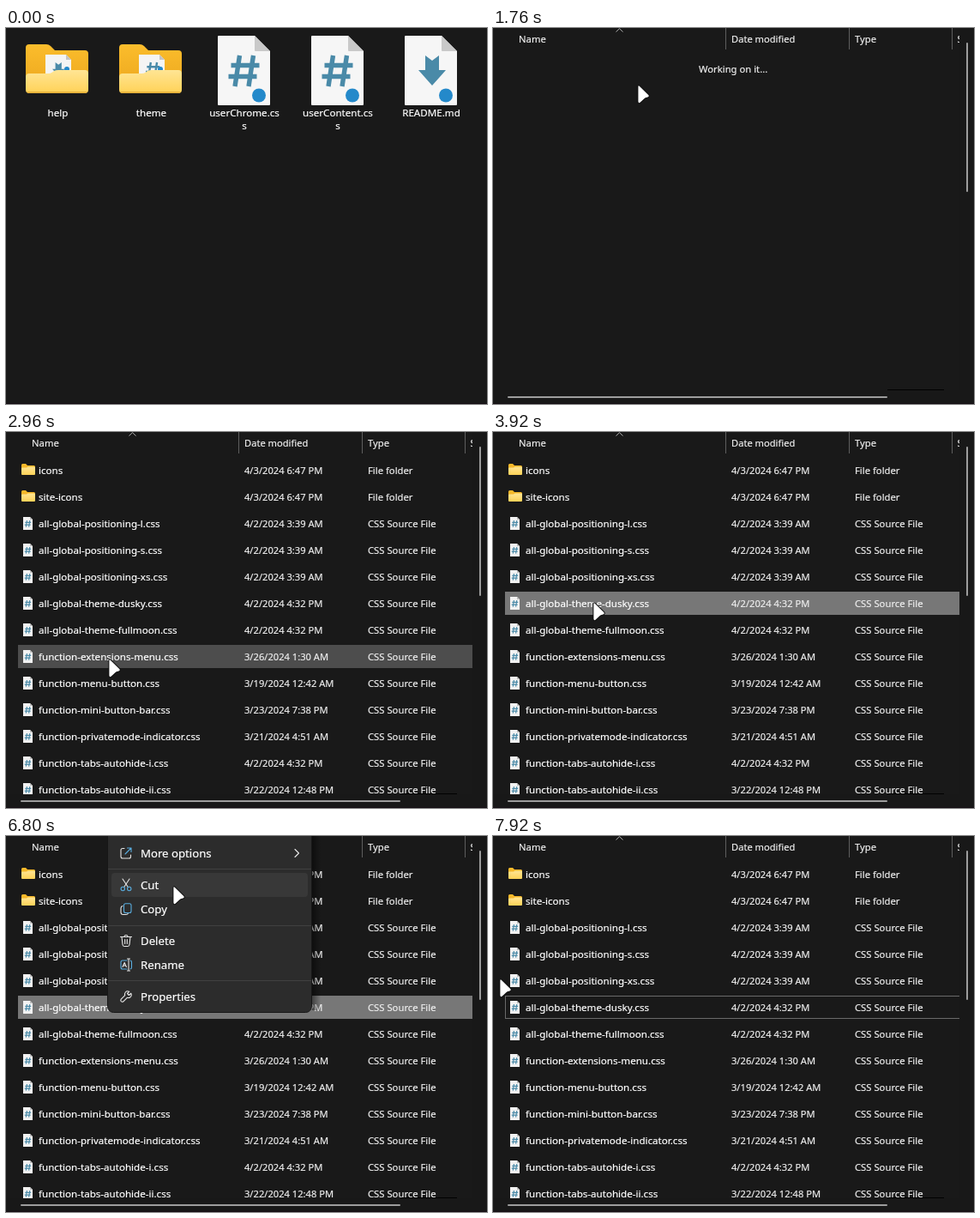
Animation, 561 px wide and 438 px high, one loop 8000 ms. Source, as an HTML page:

```html
<!DOCTYPE html>
<html lang="en">
<head>
<meta charset="utf-8">
<title>File browser</title>
<style>
html, body { margin: 0; width: 100%; height: 100%; overflow: hidden; background: #191919; }
svg { display: block; width: 561px; height: 438px; }
text { font-family: "Noto Sans", "Open Sans", sans-serif; font-size: 11.6px; fill: #fff; stroke: #fff; stroke-width: .2px; white-space: pre; }
.mid { text-anchor: middle; }
.date, .type { fill: #eee; stroke: #eee; }
.date { font-size: 11.15px; }
.type { font-size: 11.28px; }
.menu text { font-size: 13.2px; }
.line { fill: none; stroke: #e6e6e6; stroke-width: 1.1; stroke-linecap: round; stroke-linejoin: round; }
.blue { stroke: #5aaee0; }
</style>
</head>
<body>
<svg id="stage" viewBox="0 0 561 438">
  <defs>
    <linearGradient id="front" x2="0" y2="1">
      <stop stop-color="#ffe594"/><stop offset="1" stop-color="#ffd257"/>
    </linearGradient>
    <linearGradient id="back" x2="0" y2="1">
      <stop stop-color="#fbbd2c"/><stop offset="1" stop-color="#eda81f"/>
    </linearGradient>
    <linearGradient id="shade" x1="0" x2="1">
      <stop stop-color="#000" stop-opacity=".45"/><stop offset="1" stop-color="#000" stop-opacity="0"/>
    </linearGradient>
    <g id="hash" fill="none" stroke="#4a8aa8" stroke-width="5.4">
      <path d="M13 0 7.5 36M29 0 23.500 36M3 11.500H36M0 24.500H33"/>
    </g>
    <path id="arrow" fill="#4a8aa8" d="M8 0 16 6 24 0V17H32L16 35 0 17H8Z"/>
    <g id="page">
      <path d="M1 0H43L61 18V80Q61 81 60 81H1Q0 81 0 80V1Q0 0 1 0Z" fill="#f6f6f6"/>
      <path d="M43 0 61 18H44Q43 18 43 17Z" fill="#c9c9c9"/>
      <circle cx="48" cy="69.500" r="8" fill="#2489ca"/>
    </g>
    <g id="folder">
      <path d="M0 5Q0 1 4 1H24Q27 1 29 3L34 8H69Q73 8 73 12V50H0Z" fill="url(#back)"/>
      <path d="M23 13H47L53 19V44H23Z" fill="#f4f4f4"/>
      <path d="M47 13 53 19H47Z" fill="#c4c4c4"/>
    </g>
    <g id="flap">
      <path d="M0 39Q0 35 4 35H26Q29 35 31 33.500L33 32Q35 31 38 31H69Q73 31 73 35V54Q73 58 69 58H4Q0 58 0 54Z" fill="url(#front)"/>
      <path d="M1 56Q2 58 4 58H69Q71 58 72 56Z" fill="#e8b43c"/>
    </g>
    <g id="dir">
      <path d="M0 1.500Q0 0 1.500 0H5L7 2H14.500Q16 2 16 3.500V11H0Z" fill="url(#back)"/>
      <path d="M0 5.500Q0 4.500 1 4.500H6L7.500 3.500H15Q16 3.500 16 4.500V12Q16 13 15 13H1Q0 13 0 12Z" fill="url(#front)"/>
    </g>
    <g id="css">
      <path d="M0 0H8L11 3V15H0Z" fill="#f2f2f2"/>
      <path d="M8 0 11 3H8Z" fill="#bdbdbd"/>
      <use href="#hash" transform="translate(1.700 4) scale(.21)"/>
    </g>
  </defs>
  <g id="grid"></g>
  <g id="list"></g>
  <g id="menu" class="menu"></g>
  <rect y="437" width="561" height="1" fill="#160f14"/>
  <path id="cursor" d="M.4 1.600Q.4 -.6 2 1L12.200 11Q13.600 12.700 11.400 13.500L8.700 14.300 7.400 15.200 2.800 19.600Q.6 21.200.4 18.500Z" fill="#fff" stroke="#111" stroke-width="2" stroke-linejoin="round" paint-order="stroke"/>
</svg>
<script>
const $ = id => document.getElementById(id);
const LOOP = 8000, STEP = 40, PITCH = 31, PICKED = 5;

// Moments at which the interface switches state
const at = { press: 1280, open: 1520, header: 1600, busy: 1680, ready: 1800, hover: 2040,
  pick: 3920, menuOn: 6280, menuOff: 6960, drop: 7920 };

// Pointer path: time, x, y
const path = [
  [120, 91, 440], [520, 145, 235], [800, 184, 96], [960, 188, 70], [1000, 166, 69], [1040, 169, 67],
  [2000, 169, 67], [2240, 141, 128], [2480, 110, 217], [2720, 116, 284], [2800, 118, 289],
  [2880, 118, 289], [2960, 120, 265], [3320, 121, 236], [3720, 119, 210], [3800, 117, 199],
  [5120, 117, 199], [5160, 117, 194], [6080, 117, 194], [6120, 117, 199],
  [6480, 117, 199], [6640, 160, 118], [6800, 195, 59], [6920, 195, 62],
  [7120, 138, 112], [7320, 58, 163], [7600, 8, 167]
];

const files = [
  ["icons", "4/3/2024 6:47 PM"], ["site-icons", "4/3/2024 6:47 PM"],
  ["all-global-positioning-l.css", "4/2/2024 3:39 AM"],
  ["all-global-positioning-s.css", "4/2/2024 3:39 AM"],
  ["all-global-positioning-xs.css", "4/2/2024 3:39 AM"],
  ["all-global-theme-dusky.css", "4/2/2024 4:32 PM"],
  ["all-global-theme-fullmoon.css", "4/2/2024 4:32 PM"],
  ["function-extensions-menu.css", "3/26/2024 1:30 AM"],
  ["function-menu-button.css", "3/19/2024 12:42 AM"],
  ["function-mini-button-bar.css", "3/23/2024 7:38 PM"],
  ["function-privatemode-indicator.css", "3/21/2024 4:51 AM"],
  ["function-tabs-autohide-i.css", "4/2/2024 4:32 PM"],
  ["function-tabs-autohide-ii.css", "3/22/2024 12:48 PM"]
];

// Label, centre y, icon strokes in a 14 px box
const commands = [
  ["More options", 20, '<path class="line" d="M5 1.500H3Q1 1.500 1 3.500V11Q1 13 3 13H10.500Q12.500 13 12.500 11V9"/><path class="line blue" d="M8.500 1H13V5.500M13 1 6 8"/>'],
  ["Cut", 57, '<path class="line" d="M3 0 9.300 9.500M11 0 4.700 9.500"/><circle class="line blue" cx="3.300" cy="11.500" r="2.200"/><circle class="line blue" cx="10.700" cy="11.500" r="2.200"/>'],
  ["Copy", 85, '<path class="line" d="M3 3.500Q1 4 1 6V11Q1 13.500 3.500 13.500H7Q9 13.500 9.500 11.800"/><rect class="line blue" x="4.500" y=".7" width="8.500" height="10.800" rx="2"/>'],
  ["Delete", 122, '<path class="line" d="M.5 2.500H13.500M5 2.500Q5 .5 7 .5T9 2.500M2 2.500 3 11.500Q3.200 13.500 5 13.500H9Q10.800 13.500 11 11.500L12 2.500M5.700 5.500V10.500M8.300 5.500V10.500"/>'],
  ["Rename", 150, '<path class="line blue" d="M8 2H3Q1 2 1 4V10Q1 12 3 12H8M12 2Q13.500 2.300 13.500 4V10Q13.500 11.700 12 12"/><path class="line" d="M8.500 0H11.500M8.500 14H11.500M10 0V14M3 9.500 5.200 4.500 7.400 9.500M3.700 8H6.700"/>'],
  ["Properties", 187, '<path class="line" d="M12.800 3.200 10.500 5.500 8.500 3.500 10.800 1.200Q8 0 6.300 2 5 3.700 5.700 5.700L1.200 10.200Q.2 11.500 1.300 12.700 2.500 13.800 3.800 12.800L8.300 8.300Q10.300 9 12 7.700 14 6 12.800 3.200Z"/>']
];

const text = (x, y, s, cls = "") => `<text x="${x}" y="${y}" class="${cls}">${s}</text>`;
const use = (id, x, y, scale = 1) => `<use href="#${id}" transform="translate(${x} ${y}) scale(${scale})"/>`;
const rect = (x, y, w, h, fill, more = "") =>
  `<rect x="${x}" y="${y}" width="${w}" height="${h}" fill="${fill}" ${more}/>`;

function folder(x, sign, label) {
  return use("folder", x, 18) + use(sign, x + 31, 40, .45) +
    `<circle cx="${x + 48}" cy="48" r="3" fill="#2489ca"/>` +
    use("flap", x, 18) + text(x + 37.500, 103, label, "mid");
}
function page(x, sign, dx, label) {
  return use("page", x, 9) + use(sign, x + dx, 32) + text(x + 31, 103, label, "mid");
}

$("grid").innerHTML =
  rect(123, 6, 92, 103, "none", 'id="tile"') +
  folder(23, "arrow", "help") + folder(132, "hash", "theme") +
  page(247, "hash", 12.500, "userChrome.cs") + text(278, 118, "s", "mid") +
  page(356, "hash", 12.500, "userContent.cs") + text(387, 118, "s", "mid") +
  page(465, "arrow", 16, "README.md");

const rowTop = i => PITCH * (i + 1);
const rows = files.map(([name, date], i) => {
  const y = rowTop(i), base = y + 18;
  const isDir = !name.includes(".");
  return rect(14, y, 530, 27, "none", 'class="row"') +
    (isDir ? use("dir", 18, y + 6) : use("css", 20, y + 6)) +
    text(38, base, name) + text(278, base, date, "date") +
    text(422, base, isDir ? "File folder" : "CSS Source File", "type");
}).join("");

$("list").innerHTML =
  `<g id="rows">${rows}</g>` +
  rect(14.500, rowTop(PICKED) + .5, 530, 26, "none", 'id="frame" stroke="#6a6a6a"') +
  `<g id="busy">${text(240, 52, "Working on it...", "type")}</g>` +
  [271, 415, 535].map(x => rect(x, 0, 1, 25, "#5e5e5e")).join("") +
  text(30, 17, "Name", "type") + text(278, 17, "Date modified", "date") +
  text(422, 17, "Type", "type") + text(541.500, 17, "Size", "type") +
  '<path d="M143.500 4.500 147.500 .7 151.500 4.500" fill="none" stroke="#aaa"/>' +
  rect(544, 0, 17, 438, "#181818") + rect(0, 422, 561, 16, "#181818") +
  rect(460, 421, 66, 1, "#000") +
  rect(17, 429, 443, 2, "#9d9d9d", 'rx="1"') + rect(552, 17, 2, 174, "#9d9d9d", 'rx="1"');

$("menu").innerHTML =
  rect(357, 0, 10, 203, "url(#shade)") +
  rect(118.500, -40, 238, 245.500, "#2c2c2c", 'rx="7" stroke="#171717"') +
  [38, 104, 168].map(y => rect(119, y, 237, 1, "#404040")).join("") +
  commands.map(([label, y, icon]) =>
    rect(123, y - 14, 229, 28, "none", 'class="cmd" rx="4"') +
    `<g transform="translate(133 ${y - 7})">${icon}</g>` + text(157, y + 5, label)).join("") +
  '<path class="line" d="M337 15.500 341.500 20 337 24.500"/>';

const rowBoxes = [...document.querySelectorAll(".row")];
const cmdBoxes = [...document.querySelectorAll(".cmd")];
const show = (id, on) => { $(id).style.display = on ? "" : "none"; };

function pointer(t) {
  const next = path.findIndex(p => p[0] > t);
  if (next < 0) return path[path.length - 1].slice(1);
  if (!next) return path[0].slice(1);
  const [t0, x0, y0] = path[next - 1], [t1, x1, y1] = path[next];
  const k = (t - t0) / (t1 - t0);
  return [x0 + (x1 - x0) * k, y0 + (y1 - y0) * k];
}

function render(t) {
  const [x, y] = pointer(t).map(Math.round);
  const menuOpen = t >= at.menuOn && t < at.menuOff;
  show("grid", t < at.open);
  show("list", t >= at.header);
  show("busy", t >= at.busy && t < at.ready);
  show("rows", t >= at.ready);
  show("frame", t >= at.drop);
  show("menu", menuOpen);
  $("cursor").setAttribute("transform", `translate(${x} ${y})`);

  const onTile = x >= 123 && x < 215 && y >= 6 && y < 109;
  $("tile").setAttribute("fill", t >= at.press ? "#777" : onTile ? "#4d4d4d" : "none");

  rowBoxes.forEach((box, i) => {
    const dy = y - rowTop(i);
    const over = t >= at.hover && !menuOpen && x >= 14 && dy >= 0 && dy < 27;
    const picked = i === PICKED && t >= at.pick && t < at.drop;
    box.setAttribute("fill", picked ? "#777" : over ? "#4d4d4d" : "none");
  });
  cmdBoxes.forEach((box, i) => {
    const over = x >= 123 && x < 352 && Math.abs(y - commands[i][1]) < 14;
    box.setAttribute("fill", over ? "#383838" : "none");
  });
}

const start = performance.now();
function tick() {
  const t = (performance.now() - start) % LOOP;
  render(Math.floor(t / STEP) * STEP);
  requestAnimationFrame(tick);
}
tick();
</script>
</body>
</html>
```
